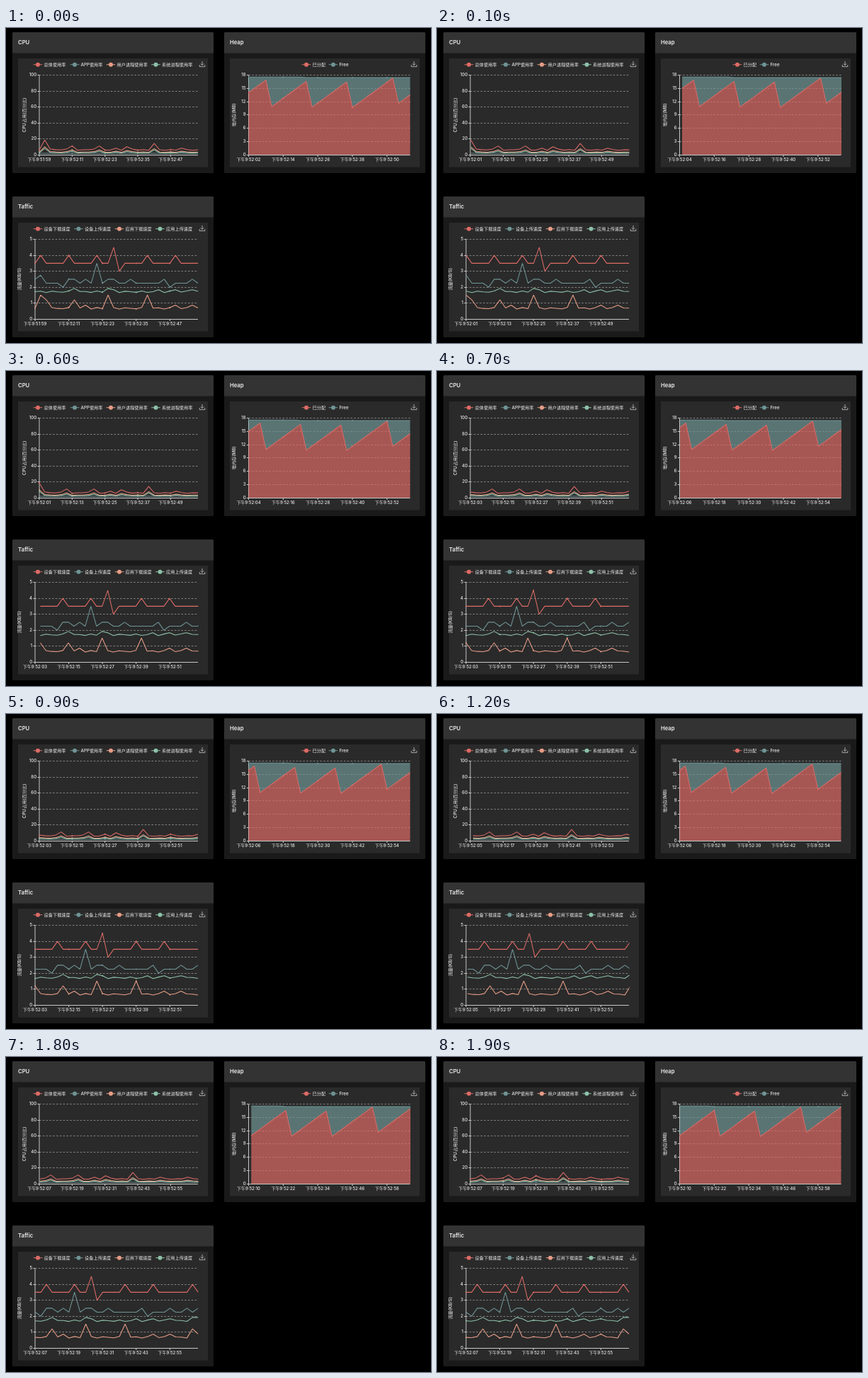
An HTML page with a canvas that plays this animation: 600x445 px, repeating every 2000 ms.

```html
<!DOCTYPE html>
<html lang="zh">
<head>
<meta charset="utf-8">
<title>Monitor</title>
<style>
html, body { margin: 0; width: 100%; height: 100%; overflow: hidden; background: #000; }
canvas { display: block; width: 600px; height: 445px; }
</style>
</head>
<body>
<canvas id="stage"></canvas>
<script>
const W = 600, H = 445, LOOP = 2000, TICK = 100;
const PERIOD = 567, SLIDE = 100;
const RED = '#dd6b66', TEAL = '#6f9495', PEACH = '#e69d87', MINT = '#8dc1a9';
const FONT = 'Inter, "Noto Sans CJK SC", "Noto Sans CJK", sans-serif';
const COUNT = 34, LABEL_EVERY = 6, PLOT_H = 112.3;

const canvas = document.getElementById('stage');
const dpr = window.devicePixelRatio || 1;
canvas.width = W * dpr;
canvas.height = H * dpr;
const ctx = canvas.getContext('2d');
ctx.scale(dpr, dpr);

const range = (n, fn) => Array.from({ length: n }, (_, i) => fn(i));
const crisp = v => Math.floor(v) + 0.5;

// A gently wavering base line; levels maps a value to the samples that reach it.
function signal(base, wobble, levels) {
  const data = range(COUNT, i => base + wobble * Math.sin(i * 2.4));
  for (const [value, samples] of Object.entries(levels)) {
    for (const i of samples) data[i] = Number(value);
  }
  return data;
}

// Memory grows steadily and falls back at each collection [sample, value].
function sawtooth(growth, collections) {
  return range(COUNT, i => {
    const [start, low] = collections.filter(c => c[0] <= i).pop();
    return low + growth * (i - start);
  });
}

const cpu = signal(6, 0.45, {
  18.5: [1], 14.2: [21], 11: [6, 11], 10: [16], 8.3: [14, 26, 31], 7.2: [2, 5, 10, 17]
});
const used = sawtooth(0.95, [[0, 14.05], [4, 10.9], [11, 10.75], [18, 10.7], [26, 11.65]]);
const heapSize = range(COUNT, i => i < 10 ? 17.58 : 17.46);

const deviceDown = signal(3.5, 0, { 4: [1, 6, 11, 20, 25, 32], 4.5: [14], 3: [15] });
const deviceUp = signal(2.25, 0, {
  2.5: [0, 6, 7, 9, 13, 14, 17, 23, 28, 31, 33], 2.75: [1], 3.5: [11], 2: [5, 24]
});
const appDown = signal(0.67, 0.05, { 1.5: [1, 13, 20], 1.2: [2, 7, 32], 0.87: [9, 25, 28, 33] });
const appUp = signal(1.71, 0.05, { 1.92: [7, 13, 32, 33], 1.84: [14, 22, 25, 28] });

const charts = [
  {
    title: 'CPU', px: 9, py: 6, left: 47, right: 271, points: 30,
    max: 100, step: 20, name: 'CPU占用(百分比)', nameX: 26.5, start: 119, delay: 46,
    series: [[cpu, RED], [cpu.map(() => 1.8), TEAL],
      [cpu.map(v => v * 0.54), PEACH], [cpu.map(v => v * 0.45 - 0.4), MINT]],
    legend: [['总体使用率', 45], ['APP使用率', 97], ['用户进程使用率', 148], ['系统进程使用率', 211.5]]
  },
  {
    title: 'Heap', px: 308, py: 6, left: 342.5, right: 570.5, points: 29,
    max: 18, step: 3, name: '堆内存(MB)', nameX: 322, start: 122, delay: 76, stacked: true,
    series: [[used, RED], [heapSize, TEAL]],
    legend: [['已分配', 424], ['Free', 462]]
  },
  {
    title: 'Taffic', px: 9, py: 238, left: 41, right: 271, points: 30,
    max: 5, step: 1, name: '流量(KB/S)', nameX: 19.5, start: 119, delay: 31,
    series: [[deviceDown, RED], [deviceUp, TEAL], [appDown, PEACH], [appUp, MINT]],
    legend: ['设备下载速度', '设备上传速度', '应用下载速度', '应用上传速度']
      .map((label, i) => [label, 45 + 57.5 * i])
  }
];

function box(x, y, w, h, color, radius = 0) {
  ctx.beginPath();
  ctx.roundRect(x, y, w, h, radius);
  ctx.fillStyle = color;
  ctx.fill();
}

function text(str, x, y, align = 'left', size = 6.2, weight = 500) {
  ctx.font = `${weight} ${size}px ${FONT}`;
  ctx.textAlign = align;
  ctx.textBaseline = 'middle';
  ctx.fillStyle = '#eee';
  ctx.fillText(str, x, y);
}

function path(points, color, width) {
  ctx.beginPath();
  points.forEach(([x, y]) => ctx.lineTo(x, y));
  ctx.strokeStyle = color;
  ctx.lineWidth = width;
  ctx.stroke();
}

function dot(x, y, r, color) {
  ctx.beginPath();
  ctx.arc(x, y, r, 0, Math.PI * 2);
  ctx.fillStyle = color;
  ctx.fill();
}

// Clock label for seconds counted from 9:50:00.
function clock(sec) {
  const m = 50 + Math.floor(sec / 60), s = String(sec % 60).padStart(2, '0');
  return `下午9:${m}:${s}`;
}

function downloadIcon(x, y) {
  path([[x, y - 4], [x, y + 1.5]], '#ddd', 0.7);
  path([[x - 2.2, y - 0.6], [x, y + 1.6], [x + 2.2, y - 0.6]], '#ddd', 0.7);
  path([[x - 3.8, y + 1], [x - 3.8, y + 3.6], [x + 3.8, y + 3.6], [x + 3.8, y + 1]], '#ddd', 0.7);
}

function drawPanel(c) {
  const { px, py } = c;
  box(px, py, 284, 199, '#1a1a1a', 1.5);
  box(px, py, 284, 29.5, '#333', [1.5, 1.5, 0, 0]);
  box(px + 8, py + 37, 268, 153.5, '#2a2a2a');
  text(c.title, px + 8, py + 14.7, 'left', 7.7, 600);
  const y = py + 45.7;
  c.legend.forEach(([label, x], k) => {
    const color = c.series[k][1];
    path([[x - 6.3, y], [x + 6.3, y]], color, 1);
    dot(x, y, 3, color);
    text(label, x + 8.6, y + 0.2);
  });
  downloadIcon(px + 268, py + 45);
}

function drawAxes(c, bottom, scale, dx, shift) {
  const base = crisp(bottom);
  for (let v = 0; v <= c.max; v += c.step) {
    const y = crisp(bottom - v * scale);
    if (v) {
      ctx.setLineDash([2.6, 2.2]);
      path([[c.left, y], [c.right, y]], '#999', 0.8);
      ctx.setLineDash([]);
    }
    path([[c.left - 2.6, y], [c.left, y]], '#eee', 0.8);
    text(String(v), c.left - 4, y, 'right', 6);
  }
  path([[c.left, bottom - c.max * scale], [c.left, bottom]], '#eee', 0.8);
  path([[c.left, base], [c.right, base]], '#eee', 0.8);
  for (let i = 0; i <= 24; i += LABEL_EVERY) {
    const x = c.left + i * dx;
    path([[x, base], [x, base + 2.6]], '#eee', 0.8);
    text(clock(c.start + 2 * (shift + i)), x, bottom + 7.2, 'center', 5.95);
  }
  ctx.save();
  ctx.translate(c.nameX, bottom - PLOT_H / 2);
  ctx.rotate(-Math.PI / 2);
  text(c.name, 0, 0, 'center');
  ctx.restore();
}

function drawArea(line, floor, color) {
  ctx.beginPath();
  [...line, ...floor].forEach(([x, y]) => ctx.lineTo(x, y));
  ctx.globalAlpha = 0.7;
  ctx.fillStyle = color;
  ctx.fill();
  ctx.globalAlpha = 1;
}

function drawSeries(c, bottom, scale, dx, shift, x0, settled) {
  const lines = c.series.map(([data]) =>
    range(c.points, i => [x0 + i * dx, bottom - data[i + shift] * scale]));
  if (c.stacked) {
    let floor = [[x0 + (c.points - 1) * dx, bottom], [x0, bottom]];
    lines.forEach((line, k) => {
      drawArea(line, floor, c.series[k][1]);
      floor = [...line].reverse();
    });
  }
  lines.forEach((line, k) => {
    const color = c.series[k][1];
    path(line, color, 1.05);
    if (!settled) return;
    line.forEach(([x, y], i) => { if (i % LABEL_EVERY === 0) dot(x, y, 1, color); });
  });
}

function drawChart(c, t) {
  const bottom = c.py + 173, scale = PLOT_H / c.max;
  const dx = (c.right - c.left) / (c.points - 1);
  const shift = Math.floor((t - c.delay) / PERIOD) + 1;
  const since = t - c.delay - (shift - 1) * PERIOD;
  const p = shift ? Math.min(1, since / SLIDE) : 1;
  const x0 = c.left + dx * (1 - p) ** 3;

  drawPanel(c);
  drawAxes(c, bottom, scale, dx, shift);
  ctx.save();
  ctx.beginPath();
  ctx.rect(c.left - 0.5, bottom - PLOT_H - 1, c.right - c.left + 1, PLOT_H + 2);
  ctx.clip();
  drawSeries(c, bottom, scale, dx, shift, x0, p === 1);
  ctx.restore();
}

function render(now) {
  const t = Math.floor((now % LOOP) / TICK) * TICK;
  box(0, 0, W, H, '#000');
  ctx.lineJoin = 'bevel';
  charts.forEach(c => drawChart(c, t));
}

const begin = performance.now();
function loop() {
  render(performance.now() - begin);
  requestAnimationFrame(loop);
}
loop();
</script>
</body>
</html>
```
